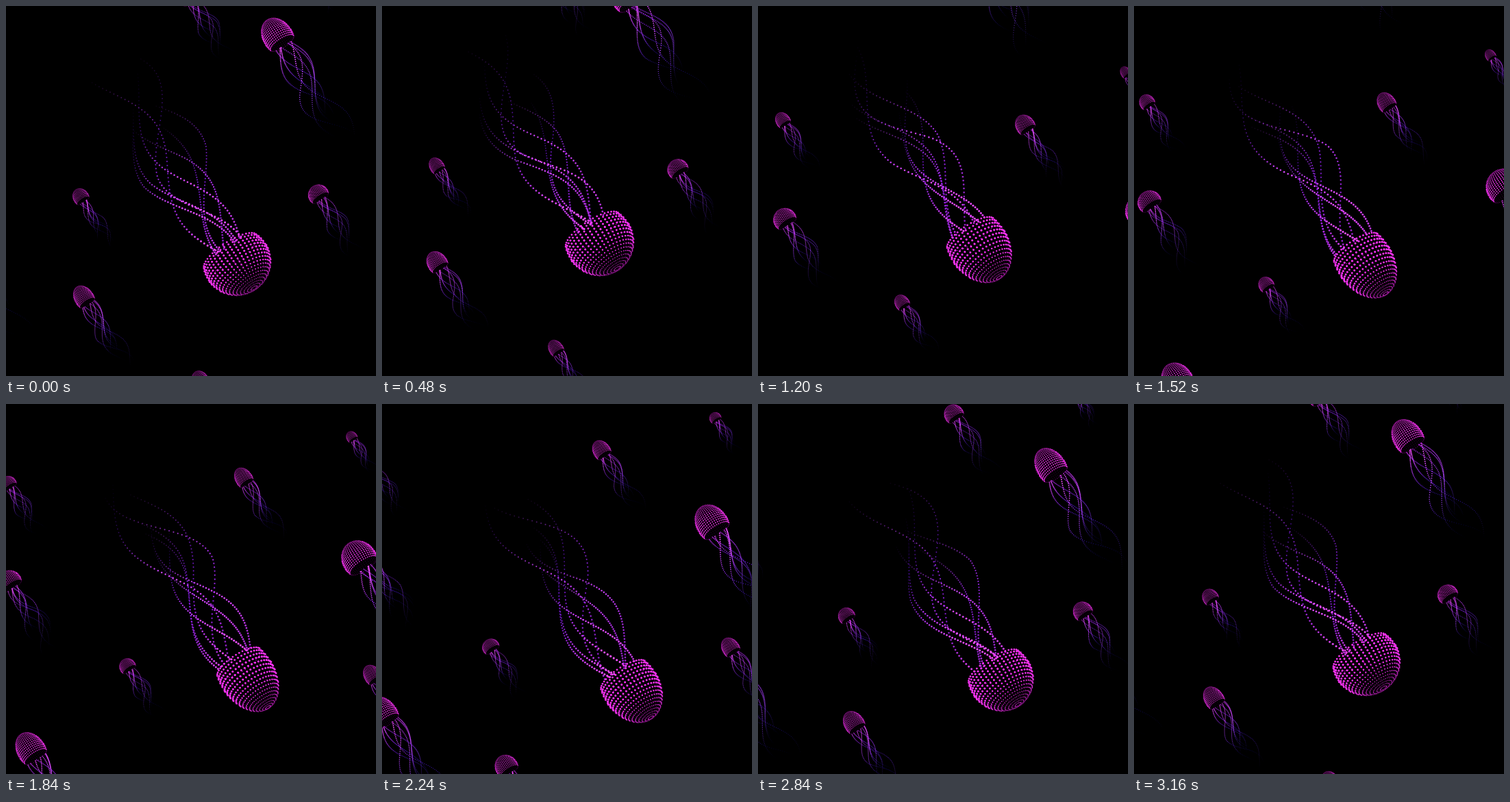
An HTML page with a canvas that plays this animation: 540x540 px, repeating every 3.2 s.

```html
<!DOCTYPE html>
<html lang="en">
<head>
<meta charset="utf-8">
<title>Jellyfish</title>
<style>
  html, body { margin: 0; width: 100%; height: 100%; overflow: hidden; background: #000; }
  canvas { display: block; width: 540px; height: 540px; }
</style>
</head>
<body>
<canvas id="stage" width="540" height="540"></canvas>
<script>
const ctx = document.getElementById('stage').getContext('2d');
const LOOP = 3200, STEP = 40, TAU = Math.PI * 2, W = TAU / LOOP;
const UX = 0.547, UY = 0.837;          // swimming axis on screen
const SIN = 0.34, COS = 0.94;          // tilt of the axis towards the viewer
const RINGS = 18, SPOKES = 42, RIM = 1.95;
const BEADS = 60, WAVE = 292;

// wave crest, sideways lean, swing, reach
const TENTACLES = [
  [40, 9, 30, 292], [170, 22, 36, 238], [160, 5, 22, 205], [215, -17, 28, 318],
  [8, -22, 32, 232], [280, 10, 42, 308], [18, -15, 30, 252], [100, 6, 30, 225]
];

// x, y, bell radius, travel per loop, surge, time of the strongest push
const SWIMMERS = [
  { x: 595.5, y: 187.5, r: 9, travel: 280, surge: 4.5, push: 1000 },
  { x: 106, y: 274, r: 12.3, travel: 318, surge: 7.5, push: 550 },
  { x: 457, y: 277, r: 15, travel: 344, surge: 8.7, push: 1700 },
  { x: 116.5, y: 430, r: 17, travel: 366, surge: 10, push: 3000 },
  { x: 174, y: 715, r: 24, travel: 440, surge: 10, push: 2000 },
  { x: 402.6, y: 53.5, r: 26, travel: 462, surge: 11, push: 2600 }
];

function dot(x, y, r) {
  if (r < 0.8) {
    const s = r * 1.78;
    ctx.fillRect(x - s / 2, y - s / 2, s, s);
  } else {
    ctx.beginPath();
    ctx.arc(x, y, r, 0, TAU);
    ctx.fill();
  }
}

// side is 1 when the bell points down right, -1 when it points up left
function jelly(cx, cy, scale, side, q) {
  const wide = 45 + 5 * Math.cos(q + 2.59);
  const tall = 54.7 - 6.2 * Math.cos(q + 3.08);
  const k = scale * side;
  const small = scale < 0.7;
  const grain = small ? scale * 1.15 : 1;
  const thread = small ? 0.15 + scale * 0.9 : 1;
  const glow = small ? 0.75 + scale * 0.4 : 1;

  const put = (along, across, r) =>
    dot(cx + k * (along * UX + across * UY), cy + k * (along * UY - across * UX), r);

  const rimAt = tall * Math.cos(RIM) * COS;
  for (const [crest, lean, swing, reach] of TENTACLES) {
    for (let i = 1; i <= BEADS; i++) {
      const f = i / BEADS;
      const d = 6 + (reach - 6) * f;
      const grow = Math.min(1, d / 150);
      const rho = 22 + (swing - 22) * grow;
      const a = TAU * (d - crest) / WAVE - (q + 3.08);
      const depth = Math.sin(a) * side;
      const hue = 290 + depth * 8 - f * (small ? 46 : 22);
      const light = 63 + depth * 4 - f * 5;
      ctx.globalAlpha = Math.min(1, 1.9 * (1 - f) + 0.06) * glow * (0.88 + 0.12 * depth);
      ctx.fillStyle = `hsl(${hue | 0},100%,${light | 0}%)`;
      put(rimAt - d, lean * (0.4 + 0.6 * grow) + rho * Math.cos(a),
          (1.5 - 0.7 * f + 0.1 * depth) * thread);
    }
  }

  for (const front of [false, true]) {
    ctx.fillStyle = front ? '#ff35fa' : '#a000a8';
    for (let i = 1; i <= RINGS; i++) {
      const th = RIM * i / RINGS, st = Math.sin(th), ct = Math.cos(th);
      const r = wide * st, z = tall * ct;
      for (let j = 0; j < SPOKES; j++) {
        const ph = TAU * j / SPOKES, sp = Math.sin(ph);
        const facing = side * (ct * wide * SIN + st * sp * tall * COS);
        if ((facing > 0) !== front) continue;
        const edge = i === RINGS;
        ctx.globalAlpha = glow * (front ? 0.4 + 0.6 * st : edge ? 0.9 : 0.35);
        put(z * COS - r * sp * SIN, r * Math.cos(ph),
            (front ? 0.5 + 1.05 * st * st : 0.4 + 0.5 * st) * grain);
      }
    }
  }
}

function draw(t) {
  ctx.globalAlpha = 1;
  ctx.fillStyle = '#000';
  ctx.fillRect(0, 0, 540, 540);

  for (const s of SWIMMERS) {
    const q = W * (t - s.push), scale = s.r / 49;
    for (let lap = -2; lap <= 1; lap++) {
      const gone = s.travel * (t / LOOP + lap) + s.surge * Math.sin(q);
      const x = s.x - UX * gone, y = s.y - UY * gone;
      const tail = 360 * scale;
      if (x < -tail || y < -tail || x > 540 + s.r * 1.3 || y > 540 + s.r * 1.3) continue;
      jelly(x, y, scale, -1, q);
    }
  }

  const q = W * (t - 1570), shift = 46.5 * Math.sin(q) - 6;
  jelly(342 + UX * shift, 381 + UY * shift, 1, 1, q);
}

const start = performance.now();
let shown = -1;
function tick() {
  const ms = Math.max(0, performance.now() - start) % LOOP;
  const t = Math.floor(ms / STEP) * STEP;
  if (t !== shown) draw(shown = t);
  requestAnimationFrame(tick);
}
tick();
</script>
</body>
</html>
```
